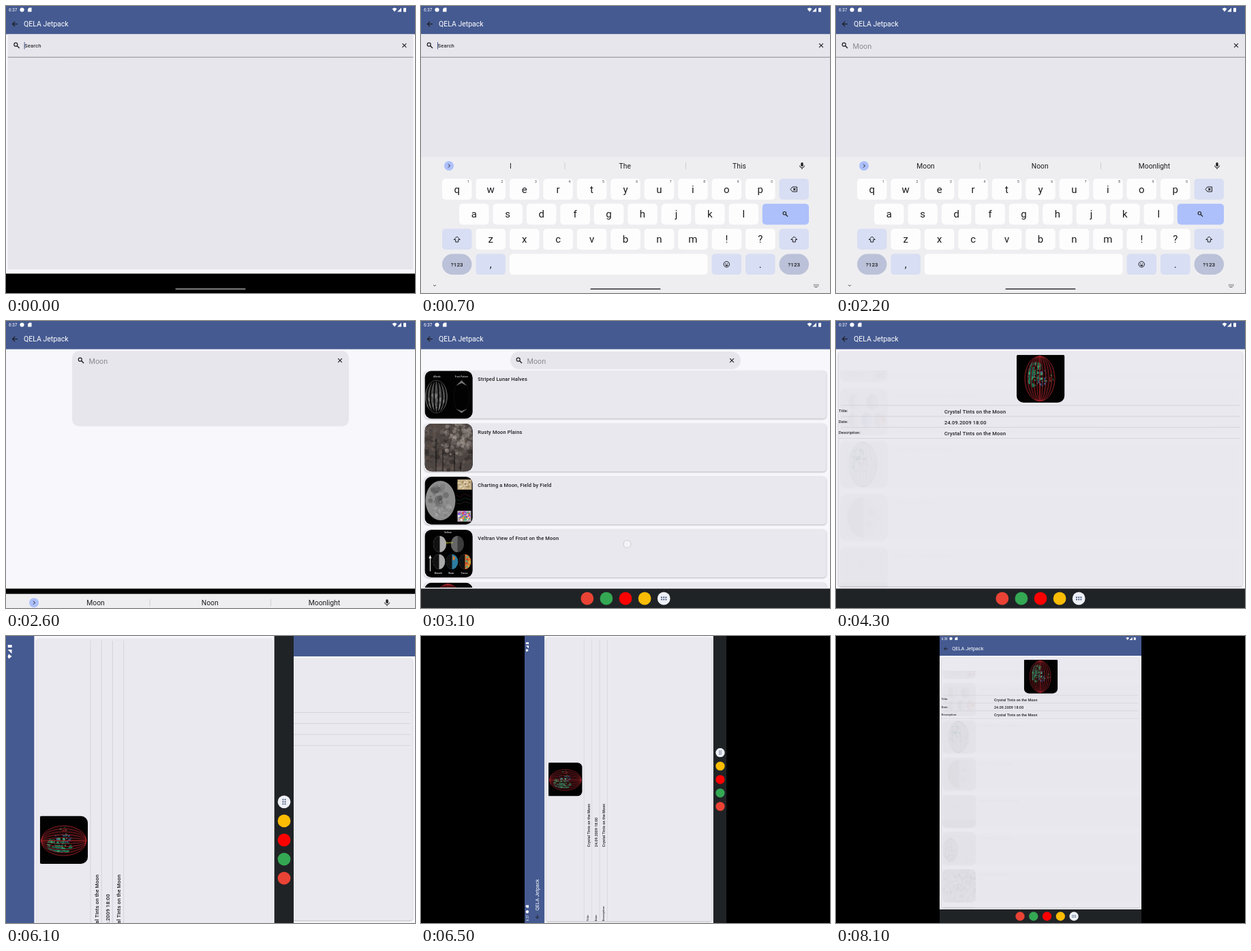
An HTML page with a canvas for the animation above (8.3 s loop, 600x422 px).

```html
<!DOCTYPE html>
<html lang="en">
<head>
<meta charset="utf-8">
<title>Tablet search and rotation</title>
<style>
html, body { margin: 0; width: 100%; height: 100%; overflow: hidden; background: #000; }
canvas { display: block; }
</style>
</head>
<body>
<canvas id="stage" width="600" height="422"></canvas>
<script>
const c = document.getElementById('stage').getContext('2d');
const LOOP = 8300, W = 600, H = 422, TURN = 2 * Math.PI, INK = '#1d1d20', PAGE = '#f8f7fb', PANEL = '#e7e6ec';
const DETAIL = 'Crystal Tints on the Moon';
const TITLES = ['Striped Lunar Halves', 'Rusty Moon Plains', 'Charting a Moon, Field by Field',
  'Veltran View of Frost on the Moon', DETAIL, 'Craters in Late Light', 'Moon over a Calm Plain'];
const SCROLL_END = 209, ROW = 77.9;

const lerp = (a, b, k) => a + (b - a) * k;
const clamp = v => Math.max(0, Math.min(1, v));
const ease = (t, a, b) => { const k = clamp((t - a) / (b - a)); return k * k * (3 - 2 * k); };
const seeded = s => () => (s = (s * 16807) % 2147483647) / 2147483647;

function rect(x, y, w, h, color, r = 0) {
  c.fillStyle = color;
  c.beginPath();
  c.roundRect(x, y, w, h, r);
  c.fill();
}
function oval(x, y, rx, ry, color, from = 0, to = TURN) {
  c.fillStyle = color;
  c.beginPath();
  c.ellipse(x, y, rx, ry, 0, from, to);
  c.fill();
}
const disc = (x, y, r, color) => oval(x, y, r, r, color);
function ring(x, y, rx, ry, color, w = 1) {
  c.strokeStyle = color;
  c.lineWidth = w;
  c.beginPath();
  c.ellipse(x, y, rx, ry, 0, 0, TURN);
  c.stroke();
}
function line(color, w, ...p) {
  c.strokeStyle = color;
  c.lineWidth = w;
  c.beginPath();
  for (let i = 0; i < p.length; i += 2) c.lineTo(p[i], p[i + 1]);
  c.stroke();
}
function poly(color, ...p) {
  c.fillStyle = color;
  c.beginPath();
  for (let i = 0; i < p.length; i += 2) c.lineTo(p[i], p[i + 1]);
  c.fill();
}
function text(s, x, y, size, color = INK, weight = 400, align = 'left') {
  c.font = `${weight} ${size}px Roboto, sans-serif`;
  c.letterSpacing = weight === 500 ? '.15px' : '0px';
  c.fillStyle = color;
  c.textAlign = align;
  c.fillText(s, x, y);
}
function at(x, y, draw) {
  c.save();
  c.translate(x, y);
  draw();
  c.restore();
}
function clip(x, y, w, h, r = 0) {
  c.beginPath();
  c.roundRect(x, y, w, h, r);
  c.clip();
}
function card(x, y, w, h, color, r) {
  c.save();
  c.shadowColor = 'rgba(0,0,0,.3)';
  c.shadowBlur = 2.5;
  c.shadowOffsetY = .8;
  rect(x, y, w, h, color, r);
  c.restore();
}

const searchIcon = (x, y, s = 1) => {
  ring(x - 1.3 * s, y - 1.3 * s, 2.5 * s, 2.5 * s, INK, 1.2 * s);
  line(INK, 1.4 * s, x + .6 * s, y + .6 * s, x + 4 * s, y + 4 * s);
};
const closeIcon = (x, y, s = 2.9) => {
  line(INK, 1.1, x - s, y - s, x + s, y + s);
  line(INK, 1.1, x - s, y + s, x + s, y - s);
};

// Thumbnails, each on a 70 x 70 tile
function meridians(x, y, rx, ry, color, w) {
  for (let k = 0; k < 6; k++) ring(x, y, rx * k / 5, ry, color, w);
}
function halfMoon(x, y, r, left, right) {
  oval(x, y, r * .8, r, right);
  oval(x, y, r * .8, r, left, Math.PI / 2, Math.PI * 1.5);
}
// Scatters soft spots of the given colours inside an ellipse
function speckle(seed, count, x, y, rx, ry, size, colors) {
  const rnd = seeded(seed);
  for (let i = 0; i < count; i++) {
    const a = rnd() * TURN, d = Math.sqrt(rnd());
    disc(x + rx * d * Math.cos(a), y + ry * d * Math.sin(a), size * (.3 + rnd()), colors[i % colors.length]);
  }
}
const PICTURES = [
  () => {
    text('Albedo', 18, 10, 3, '#ddd', 500, 'center');
    text('Frost Pattern', 54, 10, 3, '#ddd', 500, 'center');
    oval(17, 38, 16, 24, '#505050');
    speckle(5, 50, 17, 45, 13, 15, 2.5, ['rgba(150,150,150,.5)', 'rgba(60,60,60,.5)']);
    for (const k of [.2, .55, .85]) ring(17, 38, 16 * k, 24, '#050505', 2);
    ring(17, 38, 16, 24, '#777', .5);
    ring(54, 38, 11, 24, '#151515', .6);
    poly('#777', 46, 22, 54, 14, 62, 22, 54, 18);
    poly('#777', 46, 56, 54, 62, 62, 56, 54, 59);
  },
  () => {
    rect(0, 0, 70, 70, '#4c4542');
    speckle(91, 260, 24, 42, 48, 46, 3, ['rgba(45,40,38,.5)', 'rgba(92,78,70,.5)', 'rgba(110,98,92,.4)']);
    speckle(17, 130, 46, 22, 26, 24, 3, ['rgba(165,155,150,.5)', 'rgba(120,112,108,.5)', 'rgba(70,62,58,.5)']);
    for (const [x, y] of [[16, 22], [26, 38], [43, 40], [52, 58]]) rect(x, y, 1, 70 - y, '#161413');
  },
  () => {
    oval(23, 35, 22, 29, '#8e8e8e');
    speckle(37, 40, 19, 27, 13, 15, 3.5, ['rgba(75,75,75,.4)', 'rgba(110,110,110,.4)']);
    speckle(29, 50, 25, 47, 14, 13, 2, ['rgba(175,175,175,.45)', 'rgba(120,120,120,.4)']);
    rect(48, 4, 21, 15, '#c2ad85');
    speckle(8, 40, 58, 11, 9, 6, 1.4, ['#d9c9a0', '#a58a62', '#e5dcc4']);
    ['#312', '#132c26', '#222'].forEach((col, i) => line(col, .8, 46, 27 + i * 6, 52, 30 + i * 5, 58, 25 + i * 6, 68, 29 + i * 5));
    rect(48, 50, 20, 16, '#b9a9b4');
    speckle(66, 70, 58, 58, 9, 7, 1.5, ['#d44', '#dda244', '#45b87c', '#4b52d7', '#b35ac4', '#eee']);
  },
  () => {
    text('Veltran', 34, 5, 3, '#eee', 500, 'center');
    halfMoon(22, 21, 12, '#111', '#aaa');
    halfMoon(48, 21, 12, '#666', '#3c3c3c');
    text('Equator', 36, 20, 3, '#dd4', 500, 'center');
    line('#fff', 1, 8, 40, 8, 61);
    poly('#fff', 6, 42, 8, 37, 10, 42);
    halfMoon(21, 47, 11, '#111', '#aaa');
    halfMoon(40, 47, 11, '#111', '#2b7da0');
    poly('#d87932', 41, 38, 45, 41, 43, 45, 41, 44);
    halfMoon(59, 47, 11, '#111', '#d87635');
    speckle(21, 22, 63, 47, 3, 8, 1.6, ['#4aa876', '#c43b2b', '#d8a035']);
    ['Warmth', 'Water', 'Traces'].forEach((s, i) => text(s, 20 + i * 19, 65, 3, '#eee', 500, 'center'));
  },
  () => {
    oval(34, 35, 22, 33, '#1c0809');
    speckle(12, 60, 28, 29, 11, 17, 2.6, ['#15714c', '#26a067', '#1d5a4c']);
    speckle(44, 40, 36, 33, 8, 14, 1.4, ['#335b90', '#0d1a1c', '#3a9c78']);
    speckle(53, 10, 50, 35, 3, 6, 1.5, ['#1f8f5c', '#7c1c22']);
    for (const k of [.25, .6, .85]) ring(34, 35, 22 * k, 33, '#050506', 1.6);
    meridians(34, 35, 22, 33, '#a8222a', .8);
  },
  () => { halfMoon(35, 35, 30, '#1b1b1b', '#8b8b8b'); disc(46, 28, 4, '#666'); disc(43, 45, 5, '#757575'); },
  () => { disc(35, 28, 15, '#c8c8c4'); disc(31, 25, 5, '#999'); rect(0, 54, 70, 16, '#303641'); }
];
function picture(i, x, y, corners = 10) {
  at(x, y, () => {
    clip(0, 0, 70.2, 70.2, corners);
    rect(0, 0, 71, 71, '#020202');
    PICTURES[i]();
  });
}

// App parts, laid out for a screen of w x h
function header(w, clock) {
  rect(0, 0, w, 41.4, '#455a91');
  text(clock, 4, 8, 6.4, '#fff');
  disc(23.5, 5.5, 3.1, '#fff');
  poly('#fff', 32, 4.5, 34, 2.5, 37.5, 2.5, 37.5, 8.5, 32, 8.5);
  poly('#fff', w - 33.5, 4, w - 30, 2.5, w - 26.5, 4, w - 30, 8.5);
  poly('#fff', w - 26, 8.5, w - 20, 2.5, w - 20, 8.5);
  rect(w - 17, 2.7, 4, 6, '#fff', .7);
  line(INK, 1.2, 17, 26.5, 9.5, 26.5);
  line(INK, 1.2, 13.2, 22.8, 9.5, 26.5, 13.2, 30.2);
  text('QELA Jetpack', 26, 30.2, 10.5, '#fff');
}
function dock(w, h) {
  rect(0, h - 28.4, w, 30, '#202326');
  const mid = w > 500 ? w / 2 : w / 2 + 13, y = h - 14;
  ['#ea4335', '#34a853', '#f00', '#fbbc04', '#eef0f6'].forEach((col, i) => disc(mid + (i - 2) * 28.1, y, 9.4, col));
  for (let i = 0; i < 6; i++) disc(mid + 53 + i % 3 * 3.2, y - 1.6 + Math.floor(i / 3) * 3.2, 1.1, '#46587c');
}
function rows(w, h, scroll) {
  c.save();
  clip(0, 72.5, w, h - 102.5);
  for (let i = 0; i < 11; i++) {
    const y = 73 + i * ROW - scroll, n = i % TITLES.length;
    if (y < -5 || y > h) continue;
    card(5, y, w - 10.5, 70.5, '#e9e8ee', 5);
    picture(n, 5.5, y + .2);
    text(TITLES[n], 83.3, y + 15.4, 7.5, INK, 500);
  }
  c.restore();
}
// open: 0 is the collapsed pill, 1 the full search panel
function searchBox(w, open, query) {
  const left = lerp(w / 2 - 169, 0, open), right = w - left, top = lerp(45, 41.4, open);
  rect(left, top, right - left, lerp(71, 394, open) - top, PANEL, 13 * (1 - open));
  if (open > .3) line('#77767c', .8, left, 75.3, right, 75.3);
  const x = left + 13;
  searchIcon(x, 58);
  closeIcon(right - 13, 58);
  if (query) text(query, x + 11.5, 63.4, 10.8, '#89898e');
  else {
    text('Search', x + 11.5, 61.2, 7.6, '#333338', 500);
    line('#465a92', 1, x + 11.5, 53, x + 11.5, 63.5);
  }
}
function listScreen(w, h, clock, scroll, results = true) {
  rect(0, 0, w, h, PAGE);
  header(w, clock);
  searchBox(w, 0, 'Moon');
  if (results) rows(w, h, scroll);
  dock(w, h);
}
// bare: 0 with system bars, 1 with both bars gone
function detailScreen(w, h, clock, ghost = 0, bare = 0) {
  at(0, -11.5 * bare, () => {
    rect(0, 0, w, h - 10 + 22 * bare, PAGE);
    header(w, clock);
    card(3.5, 45, w - 7.5, h - 77 + 39.5 * bare, '#eae9f0', 3);
    if (ghost) {
      c.globalAlpha = ghost;
      rows(w, h, SCROLL_END);
      c.globalAlpha = 1;
    }
    picture(4, w / 2 - 35, 49.8, [2, 2, 10, 10]);
    [['Title:', DETAIL], ['Date:', '24.09.2009 18:00'], ['Description:', DETAIL]].forEach(([label, value], i) => {
      const y = 124 + i * 16.2;
      line('#cfced5', .8, 7, y, w - 7, y);
      text(label, 4, y + 10, 5.6, INK, 500);
      text(value, 6.3 + .2545 * w, y + 12, 7.5, INK, 500);
    });
    line('#cfced5', .8, 4, 172.6, w - 7, 172.6);
  });
  if (bare < 1) at(0, 28 * bare, () => dock(w, h));
}

function key(x, y, w, label, color = '#fdfdfe', r = 5, size = 15) {
  rect(x, y, w, 30.7, color, r);
  text(label, x + w / 2, y + 15.5 + size * .34, size, INK, size < 10 ? 500 : 400, 'center');
}
function shiftIcon(x, y) {
  line(INK, 1, x, y - 4, x + 4.5, y + .5, x + 2, y + .5, x + 2, y + 4, x - 2, y + 4, x - 2, y + .5, x - 4.5, y + .5, x, y - 4);
}
function keyboard(words, pressed) {
  const SOFT = '#d8def3', MOD = '#bbc1d8', BLUE = '#adc0fb', step = 49.45, kw = 43.5;
  rect(0, 222, W, 200, '#eeeef1');
  disc(41, 235, 7, BLUE);
  line(INK, 1, 40, 232.5, 42.5, 235, 40, 237.5);
  words.forEach((s, i) => text(s, 131.5 + i * 167.7, 239, 10.3, INK, 400, 'center'));
  for (const x of [211, 388.5]) line('#cdcdd2', 1, x, 230, x, 240);
  rect(557.3, 230, 3.4, 6, INK, 1.7);
  line(INK, 1, 555.5, 234.5, 556.5, 237, 559, 238, 561.5, 237, 562.5, 234.5);
  line(INK, 1, 559, 238, 559, 240);

  const letters = (s, x, y) => [...s].forEach((ch, i) => key(x + i * step, y, kw, ch, ch === pressed ? '#d3d5df' : undefined));
  letters('qwertyuiop', 31, 254);
  for (let i = 0; i < 10; i++) text((i + 1) % 10, 69.5 + i * step, 260, 5, '#444', 400, 'center');
  key(525.5, 254, kw, '', SOFT);
  line(INK, 1, 542, 269.5, 545, 266, 551.5, 266, 551.5, 273, 545, 273, 542, 269.5);
  closeIcon(547.8, 269.5, 1.5);
  letters('asdfghjkl', 56, 290.8);
  key(500.8, 290.8, 68.2, '', pressed === 'go' ? '#8fa5e6' : BLUE);
  searchIcon(534.5, 306, .9);
  letters('zxcvbnm!?', 80.5, 327.6);
  for (const x of [31, 525.5]) {
    key(x, 327.6, kw, '', SOFT);
    shiftIcon(x + kw / 2, 343);
    key(x, 364.4, kw, '?123', MOD, 15.3, 8);
  }
  key(80.5, 364.4, kw, ',', SOFT);
  key(130, 364.4, 290.5, '');
  key(426.6, 364.4, kw, '', SOFT);
  ring(448.3, 379.8, 4.2, 4.2, INK);
  disc(446.8, 378.6, .7, INK);
  disc(449.8, 378.6, .7, INK);
  oval(448.3, 380.6, 2.3, 2, INK, 0, Math.PI);
  key(476, 364.4, kw, '.', SOFT);
  line('#555', 1, 18, 410, 20, 412, 22, 410);
  for (let i = 0; i < 8; i++) rect(576 + i % 4 * 2, 409 + Math.floor(i / 4) * 2, 1.3, 1.3, '#777');
  rect(577.5, 413, 4, 1, '#777');
  rect(248.5, 415.3, 103, 1.7, '#4b4b4e', 1);
}

function searchScene(t) {
  const typed = Math.floor(4 * clamp((t - 900) / 800));
  const open = t < 200 ? .98 : 1 - ease(t, 2200, 2800);
  const shown = ease(t, 0, 600) * (1 - ease(t, 2200, 2700));
  rect(0, 0, W, H, PAGE);
  header(W, '6:37');
  searchBox(W, open, 'Moon'.slice(0, typed));
  rect(0, 393.6, W, 29, '#000');
  rect(248.5, 415.3, 103, 1.7, '#8d8d8d', 1);
  const words = typed > 3 ? ['Moon', 'Noon', 'Moonlight'] : typed ? ['More', 'Most', 'Move'] : ['I', 'The', 'This'];
  const pressed = t === 2000 ? 'go' : typed && t < 1800 ? 'moon'[typed - 1] : '';
  if (shown) at(0, 200 * (1 - shown), () => keyboard(words, pressed));
}
function scrollScene(t) {
  const scroll = SCROLL_END * ease(t, 3100, 4100);
  listScreen(W, H, '6:37', scroll, t >= 3000);
  if (t >= 3100 && t < 3600) {
    disc(302.5, 328 - scroll, 5.5, '#f4f4f6');
    ring(302.5, 328 - scroll, 5.5, 5.5, '#c4c4ca', .8);
  }
}
function sideways(x, y, scale, width) {
  c.save();
  clip(x, 0, width, H);
  c.translate(x, y);
  c.rotate(-Math.PI / 2);
  c.scale(scale, scale);
  detailScreen(W, H, '6:37');
  c.restore();
}
function portrait(t) {
  const clock = t < 7600 ? '6:37' : '6:38';
  at(152, 0, () => {
    clip(0, 0, 296, H);
    c.scale(H / W, H / W);
    if (t < 6800) listScreen(H, W, clock, SCROLL_END);
    else detailScreen(H, W, clock, t < 7000 ? .25 : .02);
  });
}

function draw(t) {
  rect(0, 0, W, H, '#000');
  if (t < 2800) searchScene(t);
  else if (t < 4300) scrollScene(t);
  else if (t < 6100) detailScreen(W, H, '6:37', .012 * (1 - ease(t, 4200, 5200)), ease(t, 5200, 5700));
  else if (t < 6300) {
    detailScreen(W, H, '6:37', 0, 1);
    sideways(0, W, 1, H);
  } else if (t < 6700) sideways(152, H, H / W, 296);
  else portrait(t);
}

// Each picture is held for about 185 ms, on a 100 ms grid.
function held(ms) {
  const k = Math.ceil((Math.floor(ms / 100) + .5) / 1.85) - 1;
  return Math.round(k * 1.85) * 100;
}
const start = performance.now();
function tick() {
  draw(held((performance.now() - start) % LOOP));
  requestAnimationFrame(tick);
}
tick();
</script>
</body>
</html>
```
